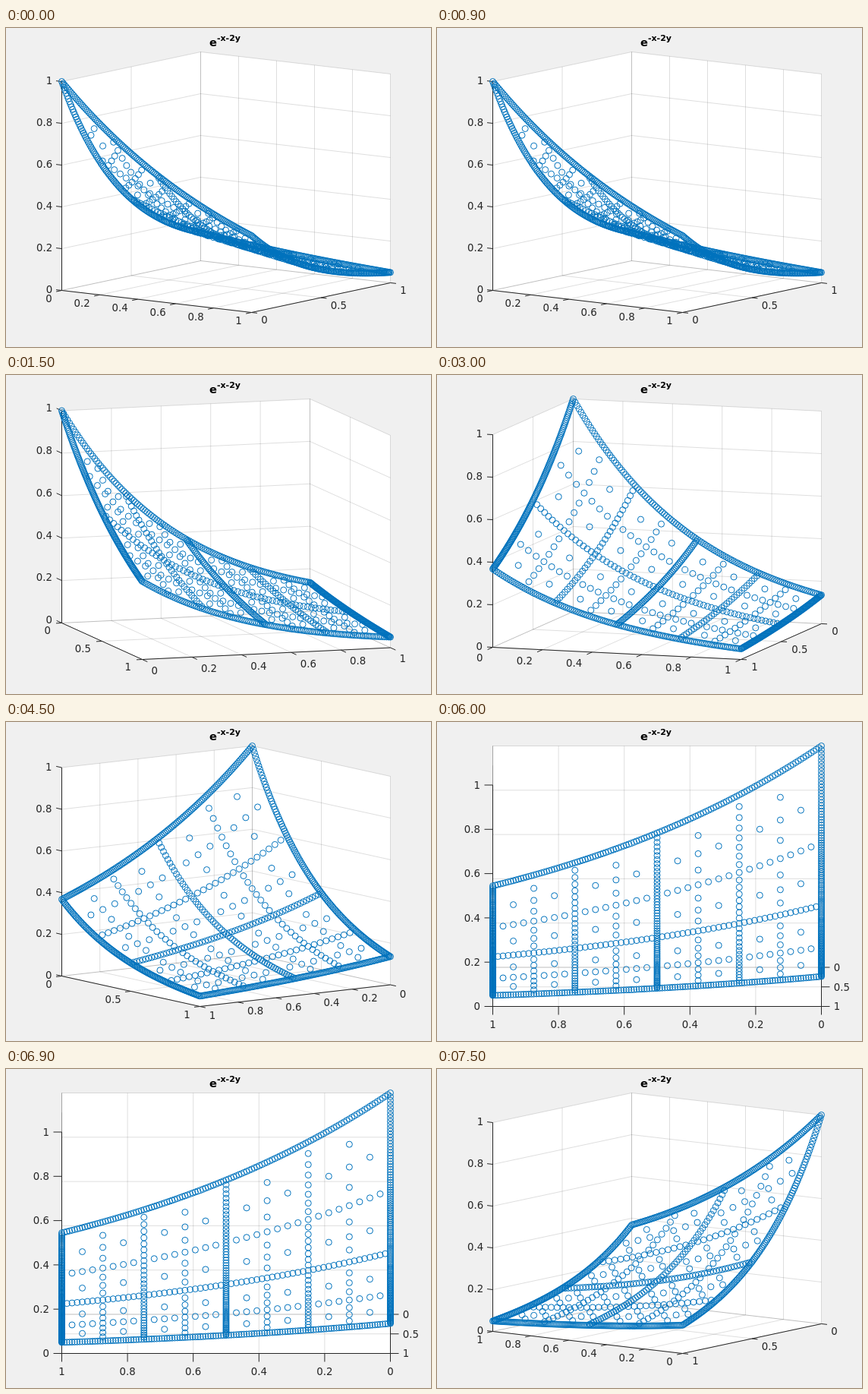
These frames come from a looping animation (560x420 px, 8000 ms). An HTML page:

```html
<!DOCTYPE html>
<html lang="en">
<head>
<meta charset="utf-8">
<title>Sparse grid surface</title>
<style>
  html, body { margin: 0; width: 100%; height: 100%; overflow: hidden; background: #f0f0f0; }
  svg { display: block; width: 560px; height: 420px; }
  text { font: 13.33px "DejaVu Sans", sans-serif; fill: #262626; }
  .title { font-weight: bold; font-size: 14.67px; fill: #000; }
  .title .power { font-size: 11px; }
  .wall { fill: #fff; }
  .grid, .axis, .marks { fill: none; stroke-width: 1; }
  .grid { stroke: #262626; stroke-opacity: .15; }
  .axis { stroke: #262626; }
  .marks { stroke: #0072bd; }
</style>
</head>
<body>
<svg viewBox="0 0 560 420">
  <text class="title" x="268" y="24">e<tspan class="power" dy="-7">-x-2y</tspan></text>
  <g id="plot" transform="translate(.5 .5)"></g>
</svg>
<script>
const LOOP = 8000, HOLD = 1500, LEVEL = 7, RADIUS = 4;
const LEFT = 73, RIGHT = 506, TOP = 31, BOTTOM = 374;

// Data coordinates (x, y) of the left, front and right floor corners.
const SIDES = {
  south: [[0, 0], [1, 0], [1, 1]],
  east: [[1, 0], [1, 1], [0, 1]],
  north: [[1, 1], [0, 1], [0, 0]]
};
// Screen corners plus label offsets: z axis, left-front axis, front-right axis.
const VIEWS = [
  { side: "south", leftY: 345, frontX: 323, rightY: 335, z: [-12.3, -1], lf: [-12.8, 11], fr: [12.8, 10] },
  { side: "south", leftY: 326, frontX: 179, rightY: 358.5, z: [-12.5, -4], lf: [-14.5, 10], fr: [12, 14.5] },
  { side: "east", leftY: 358, frontX: 400, rightY: 327, z: [-13.6, -1], lf: [-13, 14], fr: [13.8, 10] },
  { side: "east", leftY: 334, frontX: 255, rightY: 345.5, z: [-13, -1], lf: [-12.8, 10.5], fr: [12.3, 11.8] },
  { side: "north", leftY: 374, frontX: 506, rightY: 322.5, z: [-16.5, 0], lf: [0, 24], fr: [16.3, 0], flat: true },
  { side: "north", leftY: 345, frontX: 323, rightY: 335, z: [-12.3, -1], lf: [-12.8, 11], fr: [12.8, 10] }
];

const plot = document.getElementById("plot");

function add(parent, tag, attrs, text) {
  const node = document.createElementNS("http://www.w3.org/2000/svg", tag);
  for (const key in attrs) node.setAttribute(key, attrs[key]);
  if (text !== undefined) node.textContent = text;
  parent.appendChild(node);
  return node;
}

const mix = (a, b, t) => [a[0] + (b[0] - a[0]) * t, a[1] + (b[1] - a[1]) * t];
const lift = (p, d) => [p[0], p[1] - d];
const pt = p => p[0].toFixed(2) + " " + p[1].toFixed(2);
const ticks = n => Array.from({ length: n + 1 }, (_, i) => i / n);

function unit(from, to, length) {
  const dx = to[0] - from[0], dy = to[1] - from[1];
  const k = length / Math.hypot(dx, dy);
  return [dx * k, dy * k];
}

// Dyadic sparse grid: the refinement levels of x and y add up to at most LEVEL.
function sparseGrid() {
  const size = 2 ** LEVEL, points = [];
  const level = i => {
    let depth = LEVEL;
    while (depth > 0 && i % 2 === 0) { i /= 2; depth--; }
    return depth;
  };
  for (let i = 0; i <= size; i++)
    for (let j = 0; j <= size; j++)
      if (level(i) + level(j) <= LEVEL) points.push([i / size, j / size]);
  return points;
}

const points = sparseGrid();

function drawView(view) {
  const group = add(plot, "g", { visibility: "hidden" });
  const left = [LEFT, view.leftY], front = [view.frontX, BOTTOM], right = [RIGHT, view.rightY];
  const back = [left[0] + right[0] - front[0], left[1] + right[1] - front[1]];
  const height = back[1] - TOP;
  const line = (cls, a, b) => add(group, "path", { class: cls, d: `M${pt(a)}L${pt(b)}` });

  const panels = [
    [left, front, right, back],
    [left, back, lift(back, height), lift(left, height)],
    [back, right, lift(right, height), lift(back, height)]
  ];
  for (const p of panels) add(group, "path", { class: "wall", d: `M${p.map(pt).join("L")}Z` });

  // The longer floor axis gets the finer ticks.
  const leftIsLong = front[0] - left[0] > right[0] - front[0];
  const lfTicks = ticks(leftIsLong ? 5 : 2), frTicks = ticks(leftIsLong ? 2 : 5), zTicks = ticks(5);

  for (const t of lfTicks) {
    const far = mix(back, right, t);
    line("grid", mix(left, front, t), far);
    line("grid", far, lift(far, height));
  }
  for (const t of frTicks) {
    const far = mix(left, back, t);
    line("grid", mix(front, right, t), far);
    line("grid", far, lift(far, height));
  }
  for (const t of zTicks) {
    const corner = lift(back, t * height);
    line("grid", lift(left, t * height), corner);
    line("grid", corner, lift(right, t * height));
  }

  const tickLength = view.flat ? 11 : 7.5;
  function axis(from, to, steps, direction, offset, anchor, reversed) {
    line("axis", from, to);
    for (const t of steps) {
      const p = mix(from, to, t);
      line("axis", p, [p[0] + direction[0], p[1] + direction[1]]);
      add(group, "text", {
        x: p[0] + offset[0], y: p[1] + offset[1] + 4.8, "text-anchor": anchor
      }, +(reversed ? 1 - t : t).toFixed(1));
    }
  }

  const [l, f, r] = SIDES[view.side];
  const falls = (a, b) => b[0] + b[1] < a[0] + a[1];
  const outLeft = unit(front, left, tickLength);
  const outFront = unit(right, front, tickLength);
  const outRight = unit(left, front, tickLength);
  axis(left, lift(left, height), zTicks, outLeft, view.z, "end", false);
  axis(left, front, lfTicks, outFront, view.lf, view.flat ? "middle" : "end", falls(l, f));
  axis(front, right, frTicks, outRight, view.fr, "start", falls(f, r));

  // Position along the two floor edges, counted from the left corner.
  const along = (x, y, a, b) => (x - l[0]) * (b[0] - a[0]) + (y - l[1]) * (b[1] - a[1]);
  let d = "";
  for (const [x, y] of points) {
    const u = along(x, y, l, f), v = along(x, y, f, r);
    const floor = mix(left, front, u);
    const px = floor[0] + (right[0] - front[0]) * v;
    const py = floor[1] + (right[1] - front[1]) * v - height * Math.exp(-x - 2 * y);
    d += `M${pt([px - RADIUS, py])}a${RADIUS} ${RADIUS} 0 1 0 ${2 * RADIUS} 0`
       + `a${RADIUS} ${RADIUS} 0 1 0 ${-2 * RADIUS} 0`;
  }
  add(group, "path", { class: "marks", d });
  return group;
}

const groups = VIEWS.map(drawView);
const start = performance.now();
let shown = -1;

function tick() {
  const time = Math.max(0, performance.now() - start) % LOOP;
  const index = Math.floor(time / HOLD);
  if (index !== shown) {
    groups.forEach((g, i) => g.setAttribute("visibility", i === index ? "visible" : "hidden"));
    shown = index;
  }
  requestAnimationFrame(tick);
}
tick();
</script>
</body>
</html>
```
